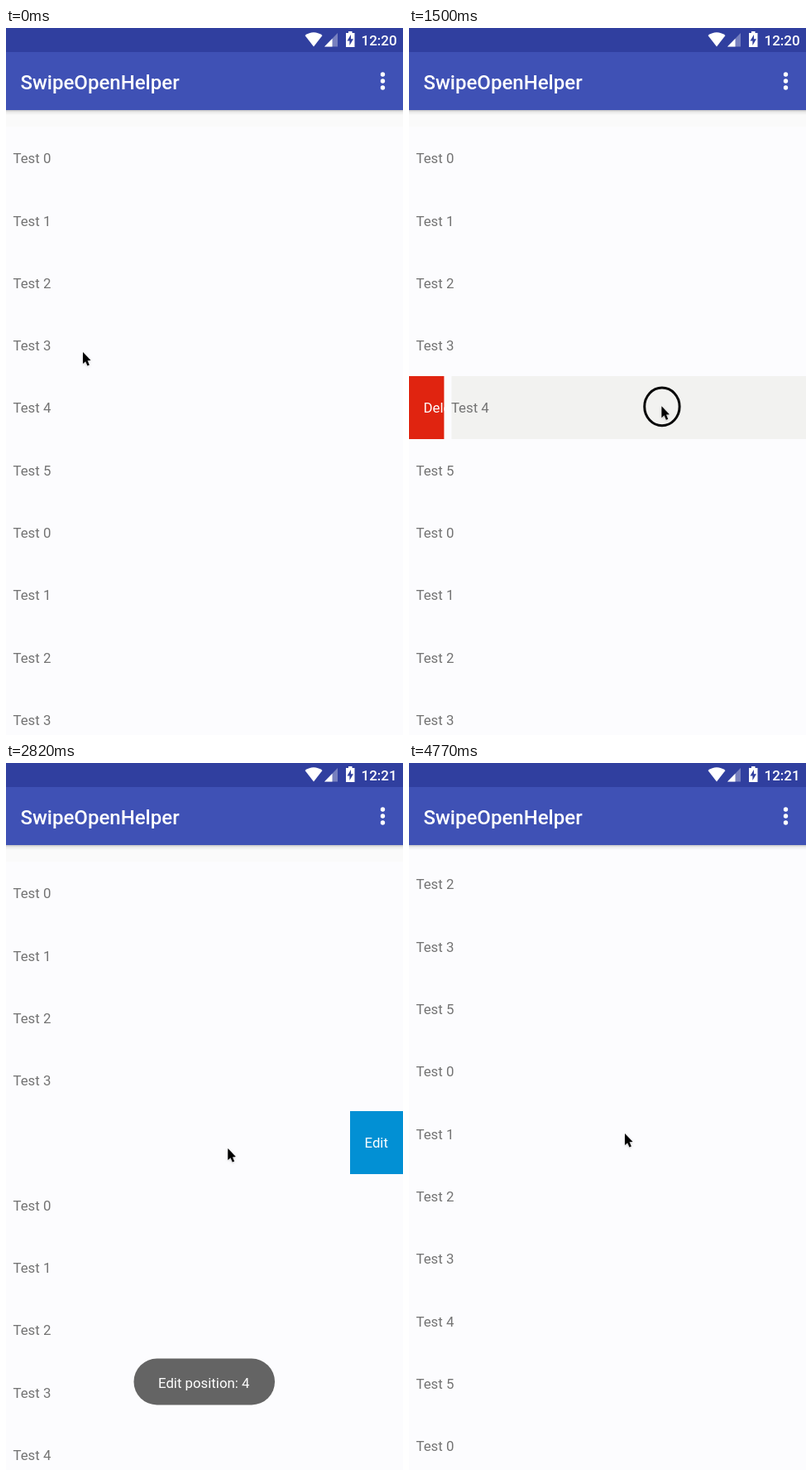
Write an HTML page with a canvas that moves like this. It is 480 px wide and 853 px high and loops after 4.8 s.

```html
<!DOCTYPE html>
<html lang="en">
<head>
<meta charset="utf-8">
<title>SwipeOpenHelper</title>
<style>
html, body { margin: 0; width: 100%; height: 100%; overflow: hidden; }
canvas { display: block; }
</style>
</head>
<body>
<canvas id="stage" width="480" height="853"></canvas>
<script>
const ctx = document.getElementById('stage').getContext('2d');
const LOOP = 4800, W = 480, H = 853, ROW = 75.3, TOP = 119.2;
const GLIDE = 190, SETTLE = 90, CLOSE = 120;
const DELETE_WIDTH = 84, EDIT_WIDTH = 64;

// A press held from `down` to `up`; `row` settles at `rest`. Without a row it scrolls.
const gesture = (down, up, x0, y0, x1, y1, row, rest) => ({ down, up, x0, y0, x1, y1, row, rest });
const tap = (down, x, y, row, rest) => gesture(down, down + 60, x, y, x, y, row, rest);
const gestures = [
  gesture(90, 390, 93, 391, 250, 397, 3, DELETE_WIDTH),
  gesture(630, 870, 309, 469, 190, 460, 4, -EDIT_WIDTH),
  gesture(1320, 1560, 199, 457, 323, 456, 4, DELETE_WIDTH),
  tap(1770, 42, 457, 4, DELETE_WIDTH),
  gesture(2220, 2400, 300, 462, 180, 462, 5, -EDIT_WIDTH),
  tap(2580, 447, 462, 5, -EDIT_WIDTH),
  gesture(2880, 3040, 218, 466, 228, 353.7),
  gesture(3210, 3510, 170, 435, 334, 434, 6, DELETE_WIDTH),
  gesture(3750, 3930, 300, 437, 216, 437, 6, 0),
  gesture(4170, 4350, 262, 496.1, 261, 447)
];

const mix = (a, b, p) => a + (b - a) * p;

function ramp(t, start, end) {
  const p = Math.min(1, Math.max(0, (t - start) / (end - start)));
  return (1 - Math.cos(Math.PI * p)) / 2;
}

function cursorAt(t) {
  let { x0: x, y0: y } = gestures[0], lastUp = 0;
  for (const g of gestures) {
    const glide = ramp(t, Math.max(lastUp, g.down - GLIDE), g.down);
    const drag = ramp(t, g.down, g.up);
    x = mix(x, g.x0, glide) + (g.x1 - g.x0) * drag;
    y = mix(y, g.y0, glide) + (g.y1 - g.y0) * drag;
    lastUp = g.up;
  }
  return [x, y];
}

// A row follows its own drags and closes when something else is touched.
function rowOffset(row, t) {
  return gestures.reduce((x, g) => g.row === row
    ? mix(x + (g.x1 - g.x0) * ramp(t, g.down, g.up), g.rest, ramp(t, g.up, g.up + SETTLE))
    : x * (1 - ramp(t, g.down, g.down + CLOSE)), 0);
}

const scrollAt = t => gestures
  .filter(g => g.row === undefined)
  .reduce((sum, g) => sum + (g.y0 - g.y1) * ramp(t, g.down, g.up), 0);

function rect(x, y, w, h, color) {
  ctx.fillStyle = color;
  ctx.fillRect(x, y, w, h);
}

function text(str, x, y, color, size = 16.8, weight = 400) {
  ctx.font = `${weight} ${size}px Roboto, sans-serif`;
  ctx.fillStyle = color;
  ctx.fillText(str, x, y);
}

function polygon(points, color) {
  ctx.beginPath();
  points.forEach(([x, y]) => ctx.lineTo(x, y));
  ctx.closePath();
  ctx.fillStyle = color;
  ctx.fill();
}

function drawRow(index, y, height, t) {
  const dx = rowOffset(index, t), baseline = y + 44.3;
  ctx.save();
  ctx.beginPath();
  ctx.rect(0, y, W, height);
  ctx.clip();
  if (dx > 0) {
    rect(0, y, W, height, '#e02410');
    text('Delete', 17.5, baseline, '#fff');
  } else if (dx < 0) {
    rect(0, y, W, height, '#0290d4');
    text('Edit', 433.5, baseline, '#fff');
  }
  rect(dx, y, W, height, '#fcfcfe');
  if (index === 4) {
    const ripple = ramp(t, 1320, 1440) - ramp(t, 1560, 1660);
    rect(dx + 9, y, W, height, `rgba(242, 242, 240, ${ripple})`);
  }
  text('Test ' + index % 6, dx + 8.5, baseline, '#737373');
  ctx.restore();
}

function drawList(t) {
  const scroll = scrollAt(t), closed = ramp(t, 1880, 2119);
  rect(0, 99, W, H - 99, '#fafafa');
  for (let i = 0; i < 14; i++) {
    const removed = i === 4;
    const y = TOP + (i - (i > 4 ? closed : 0)) * ROW - scroll;
    const top = Math.round(y), bottom = Math.round(y + ROW);
    ctx.globalAlpha = removed ? 1 - ramp(t, 1830, 1900) : 1;
    if (ctx.globalAlpha > 0 && top < H) drawRow(i, top, bottom - top, t);
  }
  ctx.globalAlpha = 1;
}

function drawBars(t) {
  const shadow = ctx.createLinearGradient(0, 99, 0, 105);
  shadow.addColorStop(0, 'rgba(0, 0, 0, .22)');
  shadow.addColorStop(0.4, 'rgba(0, 0, 0, .07)');
  shadow.addColorStop(1, 'rgba(0, 0, 0, 0)');
  rect(0, 99, W, 6, shadow);
  rect(0, 0, W, 29, '#303f9f');
  rect(0, 29, W, 70, '#3f51b5');
  text('SwipeOpenHelper', 17.5, 73.5, '#fff', 24, 500);

  ctx.fillStyle = '#fff';
  for (const y of [56, 64, 72]) {
    ctx.beginPath();
    ctx.arc(455.5, y, 2.7, 0, 7);
    ctx.fill();
  }

  // Wi-Fi, signal and battery
  ctx.beginPath();
  ctx.moveTo(372, 22.5);
  ctx.lineTo(361.5, 9);
  ctx.quadraticCurveTo(372, 1.5, 382.5, 9);
  ctx.fill();
  polygon([[385, 22.5], [401, 6], [401, 22.5]], '#7780bf');
  polygon([[385, 22.5], [394.5, 12.7], [394.5, 22.5]], '#fff');
  rect(411, 6, 10.5, 17, '#fff');
  rect(414, 4, 4.5, 2, '#fff');
  polygon([[417, 8], [412.5, 15.5], [415.4, 15.5], [415.4, 21],
           [420, 13.3], [417, 13.3]], '#303f9f');
  text(t < 2400 ? '12:20' : '12:21', 429.5, 20.5, '#fff', 17, 500);
}

function drawToast(t) {
  ctx.globalAlpha = ramp(t, 2620, 2700) - ramp(t, 3200, 3300);
  ctx.beginPath();
  ctx.roundRect(154.5, 718.5, 170.5, 56, 28);
  ctx.fillStyle = '#646464';
  ctx.fill();
  text('Edit position: 4', 184, 753.5, '#fff');
  ctx.globalAlpha = 1;
}

function drawCursor(t) {
  const [x, y] = cursorAt(t);
  if (gestures.some(g => t >= g.down && t < g.up)) {
    ctx.beginPath();
    ctx.ellipse(x + 0.5, y + 0.7, 21.2, 22.8, 0, 0, 7);
    ctx.strokeStyle = '#080808';
    ctx.lineWidth = 3;
    ctx.stroke();
  }
  ctx.save();
  ctx.translate(x, y);
  ctx.shadowColor = 'rgba(0, 0, 0, .25)';
  ctx.shadowBlur = 3;
  ctx.shadowOffsetY = 1;
  polygon([[0, 0], [0, 14], [3.2, 11.2], [5.5, 16.5], [7.8, 15.5], [5.5, 10.3], [9.5, 10]], '#000');
  ctx.restore();
}

function frame() {
  const t = performance.now() % LOOP;
  drawList(t);
  drawBars(t);
  drawToast(t);
  drawCursor(t);
  requestAnimationFrame(frame);
}
frame();
</script>
</body>
</html>
```
